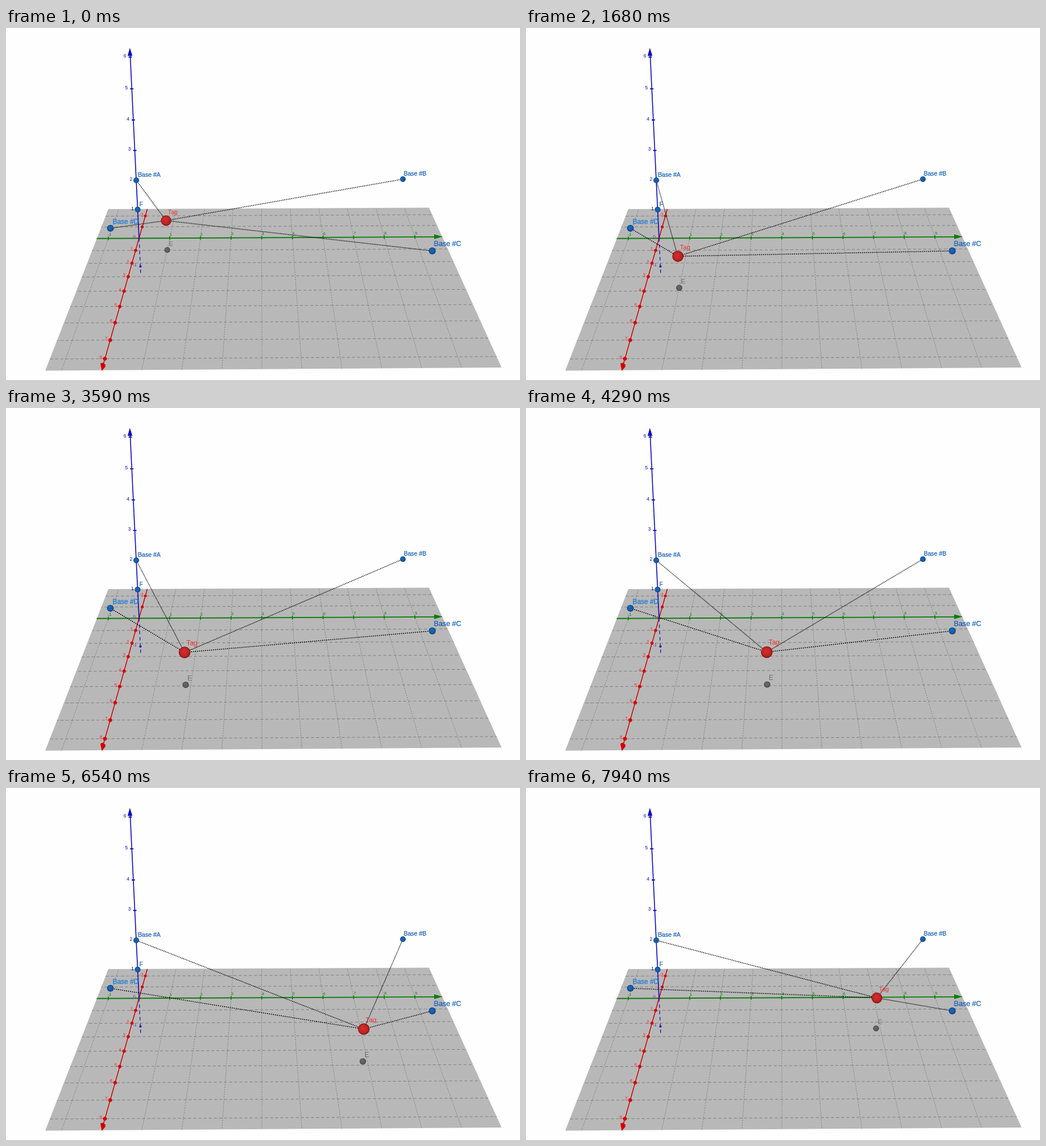
These frames come from a looping animation (904 by 620 pixels, 7990 ms). An HTML page with a canvas:

```html
<!DOCTYPE html>
<html lang="en">
<head>
<meta charset="utf-8">
<title>Tag positioning</title>
<style>
  html, body { margin: 0; width: 100%; height: 100%; overflow: hidden; background: #fefefe; }
  canvas { display: block; width: 904px; height: 620px; }
</style>
</head>
<body>
<canvas id="stage"></canvas>
<script>
const W = 904, H = 620, LOOP = 7990;
const canvas = document.getElementById('stage');
const ctx = canvas.getContext('2d');
const ratio = window.devicePixelRatio || 1;
canvas.width = W * ratio;
canvas.height = H * ratio;
ctx.scale(ratio, ratio);

const FONT = '"Liberation Sans", Arial, sans-serif';
const BLUE = '#1560b8', RED = '#d60000', GREEN = '#0a7d0a', AXIS_BLUE = '#0a0abe';
const PLATE = [[180, 319], [744, 316.5], [871.5, 598], [69, 603.5]];

// Time in ms, then the tag's place on the floor (x, y)
const PATH = [
  [0, 0.98, 1], [690, 2.137, 1], [1690, 3.785, 1], [2300, 4.77, 1], [2540, 4.92, 1],
  [3340, 4.92, 1], [3390, 4.92, 1.354], [4990, 4.92, 5.32], [5540, 4.92, 6.69],
  [5790, 4.92, 6.87], [6490, 4.92, 6.87], [6540, 4.756, 6.87], [7940, 2.47, 6.87]
];

const BASES = [
  { name: 'Base #A', at: [0, 0, 2], r: 5, label: [232, 262], color: BLUE },
  { name: 'Base #B', at: [0, 8.53, 2], r: 4.9, label: [699.5, 260.3], color: BLUE },
  { name: 'Base #C', at: [5.82, 8.585, 2], r: 6.1, label: [752.5, 384.3], color: BLUE },
  { name: 'Base #D', at: [4.09, -0.277, 2], r: 6, label: [187.5, 345.3], color: '#2078d4' }
];

const depth = (x, y, z) => 1 - 0.0273 * x + 0.0002 * y - 0.0098 * z;

function project(x, y, z = 0) {
  const w = depth(x, y, z);
  return [
    (234 - 12.25 * x + 54.04 * y - 4.72 * z) / w,
    (370.4 + 10.61 * x - 0.18 * y - 53.7 * z) / w
  ];
}

function line(a, b, color, width, dash = []) {
  ctx.strokeStyle = color;
  ctx.lineWidth = width;
  ctx.setLineDash(dash);
  ctx.beginPath();
  ctx.moveTo(...a);
  ctx.lineTo(...b);
  ctx.stroke();
  ctx.setLineDash([]);
}

function polygon(points, color) {
  ctx.fillStyle = color;
  ctx.beginPath();
  points.forEach(p => ctx.lineTo(...p));
  ctx.closePath();
  ctx.fill();
}

function dot([x, y], r, color) {
  ctx.fillStyle = color;
  ctx.beginPath();
  ctx.arc(x, y, r, 0, Math.PI * 2);
  ctx.fill();
}

function ball([x, y], r, light, mid, dark) {
  const g = ctx.createRadialGradient(x - r * 0.2, y - r * 0.25, 0, x, y, r);
  g.addColorStop(0, light);
  g.addColorStop(0.7, mid);
  g.addColorStop(1, dark);
  dot([x, y], r, g);
}

const blueBall = (p, r) => ball(p, r, '#1c6cc6', '#145aa8', '#0c3c74');

function text(s, x, y, size, color, align = 'left', weight = 0) {
  ctx.font = `${size}px ${FONT}`;
  ctx.textAlign = align;
  ctx.fillStyle = color;
  ctx.fillText(s, x, y);
  if (weight) {
    ctx.strokeStyle = color;
    ctx.lineWidth = weight;
    ctx.strokeText(s, x, y);
  }
}

const number = (n, x, y, color, size = 8.5) => text(n, x, y, size, color, 'center');

function drawFloor() {
  polygon(PLATE, '#b8b8b8');
  ctx.save();
  ctx.beginPath();
  PLATE.forEach(p => ctx.lineTo(...p));
  ctx.clip();
  for (let x = -2; x <= 8; x++) line(project(x, -4), project(x, 13), '#808080', 1, [5.5, 3.5]);
  for (let y = -1; y <= 9; y++) line(project(-3, y), project(9, y), '#7c7c7c', 0.9, [2.2, 2]);
  ctx.restore();
}

function drawAxes() {
  // Depth axis
  line([248.5, 319], [171, 593], RED, 1.5);
  polygon([[168.5, 604], [166, 591], [170, 589.5], [175, 593], [174.5, 597]], RED);
  for (let x = -2; x <= 8; x++) {
    const [px, py] = project(x, 0);
    if (x) dot([px, py], 2.6 / depth(x, 0, 0), RED);
    if (x > 0) number(x, px - 7.2, py + 0.3, '#f03030');
  }
  number('-2', 238, 332, '#f03030');

  // Width axis
  line(project(0, -1.38), project(0, 9.75), GREEN, 1.8);
  polygon([[768, 367.6], [753, 363.6], [753, 371.8]], GREEN);
  for (let y = -1; y <= 9; y++) {
    if (!y) continue;
    const [px, py] = project(0, y);
    line([px, py - 3.2], [px, py + 3.2], GREEN, 1.6);
    number(y, px + 2, py - 4.2, '#1c8a1c', 7.8);
  }

  // Height axis
  line(project(0, 0), [218.3, 46], AXIS_BLUE, 1.6);
  line(project(0, 0), [237, 434], '#3030a8', 1.5, [6, 5]);
  polygon([[217.8, 35], [214, 49], [222.3, 49]], AXIS_BLUE);
  for (let z = 1; z <= 6; z++) {
    const [px, py] = project(0, 0, z);
    line([px - 3, py], [px + 3, py], AXIS_BLUE, 1.9);
    number(z, px - 9.3, py + 0.8, AXIS_BLUE);
  }
  dot(project(0, 0, -1), 2.2, '#3030a8');
  number('-1', 226.3, 419.5, '#4040b0', 8);
  dot(project(0, 0), 2, '#6a1060');
  number('0', 225.5, 370.5, '#7a3fae');
}

function tagAt(t) {
  let i = 1;
  while (i < PATH.length - 1 && PATH[i][0] < t) i++;
  const a = PATH[i - 1], b = PATH[i];
  const k = Math.min(1, (t - a[0]) / (b[0] - a[0]));
  return [a[1] + (b[1] - a[1]) * k, a[2] + (b[2] - a[2]) * k, 1];
}

// Dots are evenly spaced in space, so foreshortened lines look denser
function link(from, to) {
  const a = project(...from), b = project(...to);
  const pixels = Math.hypot(a[0] - b[0], a[1] - b[1]);
  const units = Math.hypot(...from.map((v, i) => v - to[i]));
  const half = 0.028 * pixels / units;
  line(a, b, '#000', 1.5, [half, half]);
}

function draw(t) {
  const tag = tagAt(t);
  const foot = [tag[0], tag[1], 0];
  const tagPos = project(...tag), footPos = project(...foot);
  const near = 1 / depth(...tag), footNear = 1 / depth(...foot);

  ctx.fillStyle = '#fefefe';
  ctx.fillRect(0, 0, W, H);
  drawFloor();
  drawAxes();

  ball(footPos, 4.85 * footNear, '#6a6a6a', '#5c5c5c', '#404040');
  text('E', footPos[0] + 3, footPos[1] - 6.6 * footNear, 10.4 * footNear, '#707070');

  BASES.forEach(b => link(b.at, tag));
  BASES.forEach(b => {
    blueBall(project(...b.at), b.r);
    text(b.name, ...b.label, 10.35 / depth(...b.at), b.color, 'left', 0.25);
  });
  blueBall(project(0, 0, 1), 5);
  text('F', 234.5, 313.8, 10.4, BLUE, 'left', 0.2);

  ball(tagPos, 8.8 * near, '#d43030', '#c02424', '#861414');
  text('Tag', tagPos[0] + 3.3, tagPos[1] - 10.8 * near, 10.2 * near, '#f03434');
}

const start = performance.now();
function tick() {
  const t = (performance.now() - start) % LOOP;
  // The scene advances every 50 ms
  draw(Math.max(0, Math.floor((t + 20) / 50) * 50 - 10));
  requestAnimationFrame(tick);
}
tick();
</script>
</body>
</html>
```
